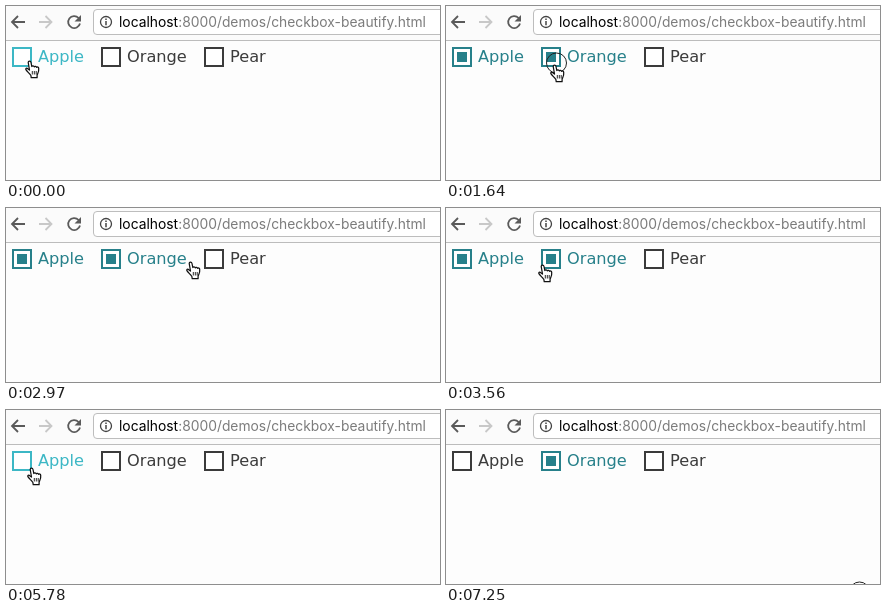
An HTML page for the animation above (7350 ms loop, 434 by 174 pixels).

```html
<!DOCTYPE html>
<html lang="en">
<head>
<meta charset="utf-8">
<title>Checkbox demo</title>
<style>
  html, body { margin: 0; width: 100%; height: 100%; overflow: hidden; background: #fdfdfd; }
  svg { display: block; width: 434px; height: 174px; }
  text { white-space: pre; }
  .url { font: 13.85px Inter, "Open Sans", sans-serif; fill: #7c7c7c; }
  .host { fill: #000; }
  .icon { fill: none; stroke: #5a5a5a; stroke-width: 1.8; }
  .option { --ink: #3b3b3b; }
  .option.hover { --ink: #3cb7c5; }
  .option.checked { --ink: #27808a; }
  .option text { font: 16.2px "DejaVu Sans", sans-serif; fill: var(--ink); }
  .frame { fill: #fff; stroke: var(--ink); stroke-width: 2; }
  .mark { fill: var(--ink); visibility: hidden; }
  .checked .mark { visibility: visible; }
</style>
</head>
<body>
<svg viewBox="0 0 434 174">
  <rect width="434" height="34" fill="#fbfbfb"/>
  <path d="M0 34.5H434" stroke="#bcbcbc"/>
  <rect x="87.5" y="3.5" width="360" height="25" rx="3.5" fill="#fff" stroke="#bdbdbd"/>
  <path class="icon" d="M19 16H6.500M12 10L6 16l6 6"/>
  <path class="icon" d="M33 16h12M39.500 10l6 6-6 6" style="stroke:#c8c8c8"/>
  <path class="icon" d="M72.600 12A6 6 0 1 0 74 17.500"/>
  <path d="M75 9v6.500h-6.500z" fill="#5a5a5a"/>
  <circle cx="100" cy="16" r="5.500" fill="none" stroke="#444" stroke-width="1.300"/>
  <path d="M100 12.500v1.500M100 15v4.200" stroke="#444" stroke-width="1.500"/>
  <text class="url" x="113" y="21"><tspan class="host">localhost</tspan>:8000/demos/checkbox-beautify.html</text>

  <g id="options"></g>

  <circle id="ring" r="10" fill="none" stroke="#222"/>
  <g id="hand">
    <path d="M3.200 2c0-1.700 2.400-2 2.800 0l.8 4c.3-1 2.200-1 2.500.3.5-.8 2-.6 2.300.5.6-.6 2-.3 2.100.9.2 2-.1 4-1 5.600l-.6 1.300v2.600H6.200l-.3-2.200C4.500 12.800 2 11 .9 9.200.3 8 1.600 7.200 2.800 8.200l1.700 1.300z"
      fill="#fff" stroke="#111" stroke-width="1.250" stroke-linejoin="round"/>
    <path d="M7.300 10.500v3.500M9.300 10.500v3.500M11.200 10.500v3.500" stroke="#111" stroke-width=".9"/>
  </g>
  <path id="arrow" d="M.5.500v14l3.300-3.100 2.200 5.100 2.500-1.100-2.200-4.900h4.600z"
    fill="#111" stroke="#fff" stroke-width="1"/>
</svg>
<script>
const LOOP = 7350;
const byId = id => document.getElementById(id);

const options = [["Apple", 6], ["Orange", 95], ["Pear", 198]].map(([label, x]) => {
  byId("options").insertAdjacentHTML("beforeend", `
    <g class="option" transform="translate(${x} 41)">
      <rect class="frame" x="1" y="1" width="18" height="18"/>
      <rect class="mark" x="5" y="5" width="10" height="10"/>
      <text x="26" y="15">${label}</text>
    </g>`);
  return byId("options").lastElementChild;
});

const stateNames = { ".": "", h: "hover", c: "checked" };

// start ms, option states, pointer (press = hand with click ring), x, y
const steps = [
  [0, "h..", "hand", 19, 54],
  [440, "h..", "hand", 20, 54],
  [740, "c..", "press", 20, 54],
  [890, "c..", "hand", 24, 56],
  [1040, "c..", "hand", 62, 58],
  [1190, "ch.", "hand", 104, 58],
  [1640, "cc.", "press", 104, 58],
  [1790, "cc.", "hand", 106, 58],
  [1930, "cc.", "hand", 158, 55],
  [2080, "cch", "hand", 220, 51],
  [2230, "ccc", "press", 222, 51],
  [2380, "ccc", "hand", 222, 51],
  [2670, "cch", "press", 222, 51],
  [2820, "cch", "hand", 221, 51],
  [2970, "cc.", "hand", 180, 53],
  [3120, "cc.", "hand", 140, 54],
  [3270, "cc.", "hand", 106, 55],
  [3410, "cc.", "hand", 89, 56],
  [3560, "cc.", "hand", 92, 56],
  [3710, "cc.", "hand", 99, 57],
  [3860, "ch.", "press", 99, 57],
  [4010, "ch.", "hand", 100, 57],
  [4150, "c..", "arrow", 109, 76],
  [4300, "c..", "arrow", 116, 95],
  [4440, "c..", "arrow", 117, 98],
  [4590, "ch.", "hand", 106, 60],
  [4890, "c..", "hand", 50, 60],
  [5040, "c..", "hand", 17, 60],
  [5490, "h..", "press", 19, 58],
  [5640, "h..", "hand", 21, 57],
  [5930, "...", "arrow", 45, 73],
  [6080, "...", "arrow", 63, 88],
  [6370, "...", "arrow", 82, 75],
  [6520, ".h.", "hand", 104, 58],
  [6660, ".c.", "press", 104, 58],
  [6810, ".c.", "arrow", 240, 115],
  [6960, ".c.", "none", 0, 0],
  [7250, ".c.", "press", 407, 183]
];

function place(id, visible, x, y) {
  const node = byId(id);
  node.style.visibility = visible ? "visible" : "hidden";
  node.setAttribute("transform", `translate(${x} ${y})`);
}

function render(time) {
  const [, states, pointer, x, y] = steps.findLast(step => step[0] <= time);
  options.forEach((option, i) => option.setAttribute("class", `option ${stateNames[states[i]]}`));
  place("hand", pointer === "hand" || pointer === "press", x, y + .5);
  place("arrow", pointer === "arrow", x, y);
  place("ring", pointer === "press", x + 6.5, y - 1);
}

const start = performance.now();
function tick() {
  render((performance.now() - start) % LOOP);
  requestAnimationFrame(tick);
}
tick();
</script>
</body>
</html>
```
